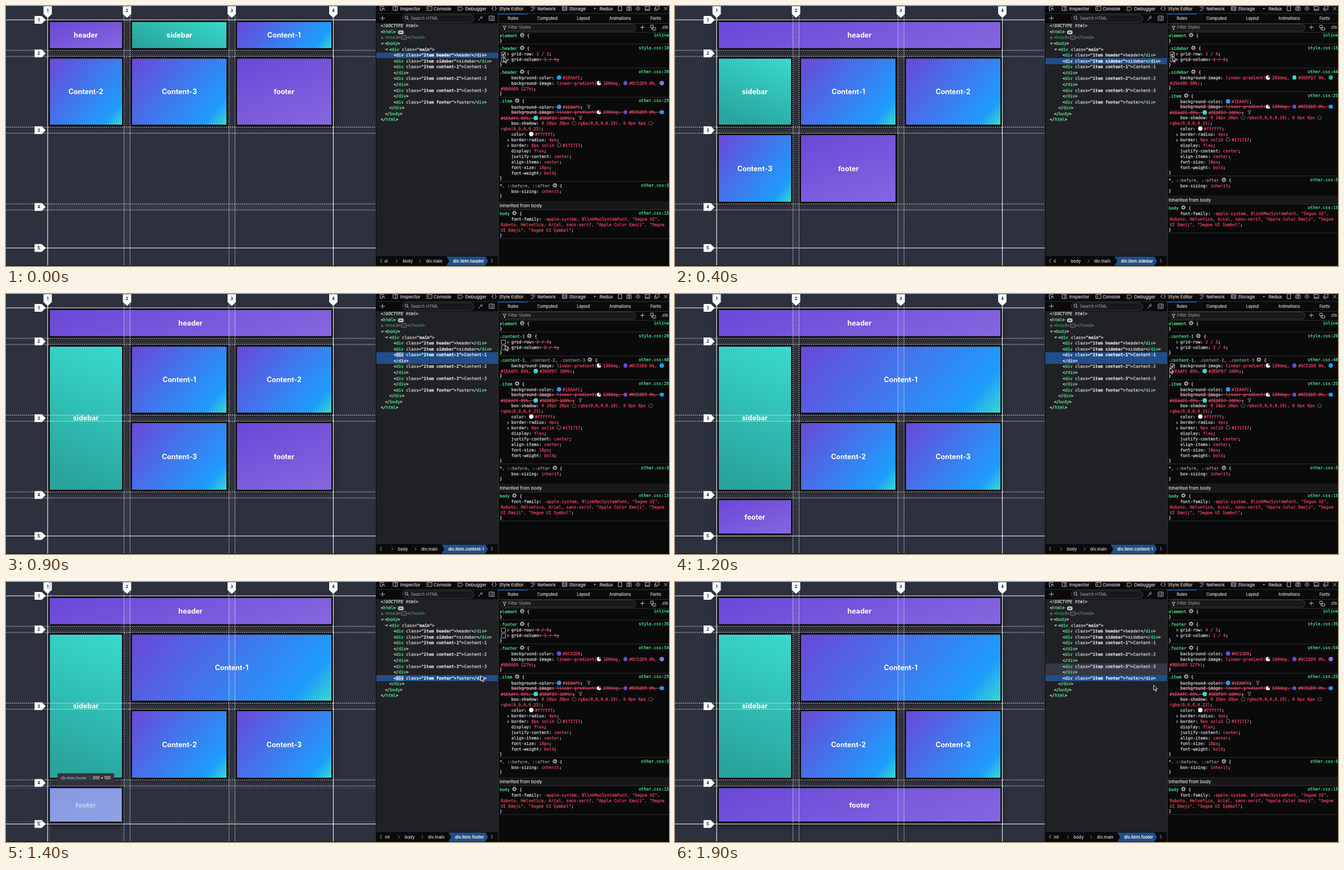
An HTML page for the animation above (2 s loop, 1194 by 469 pixels).

```html
<!DOCTYPE html>
<html lang="en">
<head>
<meta charset="utf-8">
<title>CSS grid inspector</title>
<style>
html, body { margin: 0; width: 100%; height: 100%; overflow: hidden; background: #2d303d; }
body { position: relative; font: 7.4px Inter, sans-serif; color: #dcdce0; }
svg, .layer { position: absolute; left: 0; top: 0; width: 1194px; height: 469px; }
p, .box { position: absolute; margin: 0; }
p { white-space: pre; line-height: 10px; -webkit-text-stroke: .15px; }
#grid { position: absolute; left: 75px; top: 25px; display: grid; gap: 10.9px;
  grid-template: 55px 127.6px 127.6px 68.6px / 137.5px 177.8px 177.5px; }
#grid div { box-sizing: border-box; display: flex; align-items: center; justify-content: center;
  border: 4.1px solid #111113; border-radius: 2.7px; color: #fff; font: bold 12.6px Inter, sans-serif;
  box-shadow: 0 6.9px 13.7px rgba(0,0,0,.19), 0 4px 4px rgba(0,0,0,.23); }
.mid { transform: translateX(-50%); }
.ui { font-size: 8.2px; }
.mono { font: 7.54px/9.95px "DejaVu Sans Mono", monospace; -webkit-text-stroke: .25px; }
.decl { left: 891px; text-indent: 19px; }
.off { text-decoration: line-through #b8465f .8px; }
.mono u { text-decoration: inherit; color: #ee4560; }
.mono em { font-style: normal; color: #4aee8a; }
.dim { color: #939398; }
.mono i { display: inline-block; box-sizing: border-box; width: 7.8px; height: 7.8px; margin: 0 3px 0 .2px;
  border-radius: 50%; border: .8px solid #77777c; vertical-align: -1px; }
.mono svg { position: static; width: 9px; height: 9px; vertical-align: -1.5px; margin: 0 0 0 4px; }
.tail { display: inline-block; text-indent: 0; line-height: 9px; padding-left: 6px; }
.sel, .sel em, .sel b { color: #fff; }
.flash { background: rgba(255,255,255,.28); }
#crumbs { left: 682px; top: 451px; width: 186px; height: 18px; overflow: hidden; display: flex;
  justify-content: flex-end; align-items: center; font-weight: 500; }
#crumbs span { flex: none; }
#crumbs svg { position: static; flex: none; width: 24px; height: 8px; }
#crumbs .cur { padding: 0 7px 0 12px; line-height: 17px; background: #204e8a; color: #fff; font-weight: 600;
  clip-path: polygon(0 0, calc(100% - 5px) 0, 100% 50%, calc(100% - 5px) 100%, 0 100%, 5px 50%); }
.info { transform: translateX(-50%); padding: 0 6.5px; background: #33343b; border-radius: 2px;
  font-size: 6.9px; line-height: 18px; color: #75bfff; }
</style>
</head>
<body>
<div id="grid"></div>
<svg id="lines"></svg>
<div id="highlight" class="layer"></div>
<div id="chrome" class="layer"></div>
<div id="panel" class="layer"></div>
<svg><path id="cursor" d="M0 0v9.500l2.200-2 1.600 3.600 1.600-.7-1.600-3.500h3z" fill="#111" stroke="#fff" stroke-width=".9"/></svg>
<script>
const $ = id => document.getElementById(id);
const text = (x, y, html, cls = '') => `<p class="${cls}" style="left:${x}px;top:${y - 5}px">${html}</p>`;
const box = (x, y, w, h, css) => `<div class="box" style="left:${x}px;top:${y}px;width:${w}px;height:${h}px;${css}"></div>`;
const stroke = (d, color = '#b9b9bd', extra = '') => `<path d="${d}" fill="none" stroke="${color}" ${extra}/>`;

// "|" marks a line break between a swatch and its value
const purple = 'linear-gradient(160deg, #6C52D9 0%, |#9B8AE6 127%)';
const blue = 'linear-gradient(130deg, #6C52D9 0%, |#1EAAFC 85%, #3EDFD7 100%)';
const teal = 'linear-gradient(203deg, #3EDFD7 0%, |#29A49D 90%)';
// How the screen's colour profile shows the named colours
const shades = { '#6C52D9': '#6A48D8', '#9B8AE6': '#8D6FE0', '#1EAAFC': '#1E9DFC', '#3EDFD7': '#38DACE' };
const shade = css => css.replace(/#\w{6}/g, c => shades[c] || c);

const items = {
  header: { row: '1 / 2', col: '1 / 4', line: 10, other: 39, color: '#1EAAFC', image: purple, treeRow: 5 },
  sidebar: { row: '2 / 4', col: '1 / 2', line: 15, other: 44, image: teal, treeRow: 6 },
  'content-1': { row: '2 / 3', col: '2 / 4', line: 20, other: 48, image: blue, treeRow: 7, rows: 2,
    also: '<span class="dim">, .content-2, .content-3</span>' },
  'content-2': { image: blue, treeRow: 9, rows: 2 },
  'content-3': { image: blue, treeRow: 11, rows: 2 },
  footer: { row: '4 / 5', col: '1 / 4', line: 35, other: 54, color: '#6C52D9', image: purple, treeRow: 13 },
};
const placeOrder = ['header', 'sidebar', 'content-1', 'footer'];
const label = name => name.replace(/^c/, 'C');

for (const name in items) {
  const el = items[name].el = document.createElement('div');
  el.textContent = label(name);
  el.style.background = shade(items[name].image.replace('|', ''));
  $('grid').append(el);
}

function drawGridLines() {
  const cols = [[212.5, 223.5], [401.5, 412.5]], rows = [[80, 91], [218.5, 229.5], [357, 368]];
  const white = 'stroke-width="1.1"', dash = 'stroke-dasharray="2.2 1.4" stroke-width=".9" opacity=".85"';
  const tag = (x, y, n, d) => `<g transform="translate(${x} ${y})"><path d="${d}" fill="#fff"/>
    <text y="2.5" text-anchor="middle" font-size="7" font-weight="700" fill="#111">${n}</text></g>`;
  $('lines').innerHTML = `<pattern id="hatch" width="4" height="4" patternUnits="userSpaceOnUse">
    <path d="M-1 1L1-1M0 4L4 0M3 5L5 3" stroke="#fff" stroke-width=".6" opacity=".24"/></pattern>`
    + cols.map(([a, b]) => `<rect x="${a}" y="25" width="${b - a}" height="411" fill="url(#hatch)"/>`).join('')
    + rows.map(([a, b]) => `<rect x="75" y="${a}" width="515" height="${b - a}" fill="url(#hatch)"/>`).join('')
    + stroke('M75 0V469M589.500 0V469M0 25H666M0 436.500H666', '#fff', white)
    + stroke(cols.flat().map(x => `M${x} 0V469`).join('') + rows.flat().map(y => `M0 ${y}H666`).join(''), '#fff', dash)
    + [75, 218, 406.5, 589.5].map((x, i) => tag(x, 8.5, i + 1, 'M-7.500-8h15v14l-7.500 7-7.500-7z')).join('')
    + [25, 85.5, 224, 362.5, 436.5].map((y, i) => tag(59, y, i + 1, 'M-7.500-7h13l7 7-7 7h-13z')).join('');
}

function drawChrome() {
  const tabs = [[710, 'Inspector'], [770, 'Console'], [827, 'Debugger'], [888, 'Style Editor'],
    [957, 'Network'], [1014, 'Storage'], [1069, 'Redux']];
  const sideTabs = [[913, 'Rules'], [975, 'Computed'], [1040, 'Layout'], [1106, 'Animations'], [1170, 'Fonts']];
  const pill = 'box-sizing:border-box;border:1px solid #3c3c41;border-radius:8px;background:#19191b';
  $('chrome').innerHTML = box(0, 467.5, 1194, 2, 'background:#111')
    + box(666, 0, 528, 469, 'background:#0a0a0b') + box(667, 31, 219, 420, 'background:#202124')
    + box(886, 14, 1, 455, 'background:#38383d') + box(667, 13, 527, .7, 'background:#303034')
    + box(887, 31, 307, .7, 'background:#303034') + box(887, 46.5, 307, .7, 'background:#303034')
    + box(887, 13.5, 53, 1.5, 'background:#0a84ff')
    + box(713, 15, 130, 14.5, pill) + box(889, 32, 246, 14, pill)
    + tabs.map(([x, s]) => text(x, 4.5, s, 'ui')).join('')
    + sideTabs.map(([x, s]) => text(x, 22.5, s, 'mid')).join('')
    + text(729, 22.5, '<span class="dim" style="font-size:7.7px">Search HTML</span>')
    + text(904, 39, '<span class="dim">Filter Styles</span>') + text(1180, 38.5, '.cls')
    + '<svg>' + stroke('M681 1h-7v7h3M678 4l5 4M678 8V4h4M697 1h8v7h-8zM702 1v7M758 1h9v7h-9zM760 3l2 1.500-2 1.500'
      + 'M814 2h6l3 3-3 3h-6zM878 1q-2 0-2 2t-1.500 1.500q1.500 0 1.500 1.500t2 2M880 1q2 0 2 2t1.500 1.500q-1.500 0-1.500 1.500t-2 2'
      + 'M945 2h8M947 5h6M945 8h5M1002 1h8v7h-8zM1002 3.500h8M1002 6h8M1102.500 0h6v8.500h-6zM1118 2h8v6h-8zM1120 1h4'
      + 'M1151 1h8v7h-8zM1151 6h8M1170 0h6v6h-6zM1168 3v5h5M1185 1.500l6 6M1191 1.500l-6 6'
      + 'M673.500 22h9M678 17.500v9M851 26l5-5M854 19l4 4M856 21l2-3M723 23l2.500 2.500M870 18h9v8h-9zM876 18v8M872 20l2 2-2 2'
      + 'M895 36.500h6l-2.300 3v3h-1.400v-3zM1142 38.500h8M1146 34.500v8M1161 34.500h4.500v4.500h-4.500zM1165 39h5v4.500h-5zM1163 39v3h2'
      + 'M677 456l-3 3.500 3 3.500M873.500 456l3 3.500-3 3.500')
    + '<g fill="none" stroke="#b9b9bd"><circle cx="721" cy="21" r="2.700"/><circle cx="1122" cy="5" r="1.500"/>'
    + '<circle cx="1138" cy="4.500" r="2"/><circle cx="1138" cy="4.500" r="3.800" stroke-dasharray="1.500 1.480"/></g>'
    + '<circle cx="1060.500" cy="4.500" r="1.600" fill="#3fb0a5"/></svg>';
}

const arrow = (x, y, open) => `<svg><path transform="translate(${x} ${y})" fill="${open ? '#a5a5a9' : '#77777c'}"
  d="${open ? 'M-3-1.500h6l-3 3.500z' : 'M-1.500-3v6l3.500-3z'}"/></svg>`;

function tree(sel, hover, flash) {
  const rowY = i => 36.3 + 10.57 * i;
  const close = name => `&lt;/<em>${name}</em>&gt;`;
  const open = (name, cls) => `&lt;<em>${name}</em> class=<b>"${cls}"</b>&gt;`;
  const line = (i, depth, html, cls = '') => text(674.8 + 7.7 * depth, rowY(i), html, 'mono ' + cls);
  const band = (name, color) => name ? box(667, rowY(items[name].treeRow) - 5.3, 219, 10.57 * (items[name].rows || 1),
    'background:' + color) : '';
  let html = band(hover, '#343843') + band(sel, '#204e8a')
    + line(0, 0, '<span style="font-style:italic">&lt;!DOCTYPE html&gt;</span>')
    + line(1, 0, '&lt;<em>html</em>&gt;') + box(706, 44, 10, 6.5, 'background:#c9c9cd;border-radius:3px')
    + text(711, 47, '<span style="font-size:5px;color:#222">ev</span>', 'mid')
    + line(2, 1, '<span style="opacity:.5">&lt;<em>head</em>&gt;<span style="border:.6px solid;border-radius:3px;'
      + 'font-size:5px;margin:0 1px">•••</span>' + close('head') + '</span>')
    + line(3, 1, '&lt;<em>body</em>&gt;') + line(4, 2, open('div', 'main'))
    + arrow(678, 57.5) + arrow(678, 68, 1) + arrow(685.5, 78.5, 1);
  for (const name in items) {
    const { treeRow, rows } = items[name], cls = name == sel ? 'sel' : '';
    let start = open('div', 'item ' + name) + label(name);
    if (flash && name == sel) start = start.replace('<em>', '<em class="flash">');
    html += line(treeRow, 3, start + (rows ? '' : close('div')), cls);
    if (rows) html += line(treeRow + 1, 3, close('div'), cls);
  }
  return html + line(14, 2, close('div')) + line(15, 1, close('body')) + line(16, 0, close('html'));
}

const gear = '<svg viewBox="-5 -5 10 10" fill="none" stroke="#b9b9bd"><circle r="2.500" stroke-width="1.600"/>'
  + '<circle r="4" stroke-width="1.400" stroke-dasharray="1.600 1.540"/></svg>';
const funnel = '<span class="tail"><svg style="margin:0" viewBox="0 0 9 9" fill="none" stroke="#85858a">'
  + '<path d="M1.500 2h6L5.200 5v3H3.800V5z"/></svg></span>';

function swatched(value) {
  return value.replace(/(\|?)(#\w{6}|rgba\([^)]*\)|\d+deg)/g, (_, br, v) => {
    const fill = v.endsWith('deg') ? 'conic-gradient(#555 0 30%, #fff 0)' : v == '#171717' ? '#111' : shade(v);
    return `<i style="background:${fill}${/^#(?!17)|deg/.test(v) ? ';border:0' : ''}"></i>${br && '\n'}${v}`;
  });
}

function checkbox(y, on) {
  return '<svg>' + stroke(`M892 ${y - 3.7}h7.400v7.400h-7.400z`, '#c5c5c9', 'stroke-width=".9"')
    + (on ? stroke(`M893.500 ${y}l1.800 2 3-4`, '#fff', 'stroke-width="1.200"') : '') + '</svg>';
}

// Each declaration: [name, value, {off, tail, check, expand}]
function rules(sel, rowOn, colOn, hovered) {
  const it = items[sel];
  let y = 53, html = '';
  const rule = (selector, source, decls, overhead = 22.9) => {
    html += text(889, y, `<em>${selector}</em>${gear} {`, 'mono')
      + `<p class="mono" style="right:0;top:${y - 5}px"><em>${source}</em></p>`;
    let n = 0;
    for (const [name, value, { off, tail = '', check, expand } = {}] of decls) {
      const dy = y + 11 + 9.95 * n, body = swatched(value);
      html += `<p class="mono decl ${off ? 'off' : ''}" style="top:${dy - 5}px">${name}: <u>${body}</u>;${tail}</p>`;
      if (expand) html += arrow(904.5, dy);
      if (check !== undefined) html += checkbox(dy, check);
      n += body.split('\n').length;
    }
    html += text(889, y + 9.8 + 9.95 * n, '}', 'mono');
    y += overhead + 9.95 * n;
    html += box(887, y - 7.5, 307, .7, 'background:#2c2c30');
  };
  const placed = (name, value, on) => [name, value, { off: !on, expand: 1, check: !on || hovered == 1 ? on : undefined }];
  const beaten = it.color ? { off: 1, tail: funnel } : {};

  rule('element', 'inline', []);
  rule('.' + sel, 'style.css:' + it.line, [placed('grid-row', it.row, rowOn), placed('grid-column', it.col, colOn)]);
  rule('.' + sel + (it.also || ''), 'other.css:' + it.other, [
    ...(it.color ? [['background-color', it.color]] : []),
    ['background-image', it.image, { check: hovered == 2 ? 1 : undefined }]]);
  rule('.item', 'other.css:25', [
    ['background-color', '#1EAAFC', beaten], ['background-image', blue, { off: 1, tail: funnel }],
    ['box-shadow', '0 10px 20px rgba(0,0,0,0.19), 0 6px 6px |rgba(0,0,0,0.23)'],
    ['color', '#ffffff'], ['border-radius', '4px', { expand: 1 }], ['border', '6px solid #171717', { expand: 1 }],
    ['display', 'flex'], ['justify-content', 'center'], ['align-items', 'center'],
    ['font-size', '18px'], ['font-weight', 'bold']]);
  rule('*<span class="dim">, ::before, ::after</span>', 'other.css:5', [['box-sizing', 'inherit']], 40.4);
  html += box(887, y - 22.5, 307, 15, 'background:#18181a') + text(889, y - 14.3, '<span class="ui">Inherited from body</span>');
  rule('body', 'other.css:15', [['font-family', '-apple-system, BlinkMacSystemFont, "Segoe UI",\nRoboto, Helvetica, '
    + 'Arial, sans-serif, "Apple Color Emoji", "Segoe\nUI Emoji", "Segoe UI Symbol"']]);
  return html;
}

function crumbs(sel) {
  const chevron = '<svg viewBox="0 0 24 8">' + stroke('M12 1l3 3-3 3', '#85858a') + '</svg>';
  return `<div id="crumbs" class="box"><span style="margin-right:3px">html</span>${chevron}<span>body</span>${chevron}
    <span>div.main</span><span style="width:7px"></span><span class="cur">div.item.${sel}</span></div>`;
}

function highlight(name) {
  if (!name) return '';
  const { el, image } = items[name], r = el.getBoundingClientRect(), b = 4.1, size = v => Math.round(v / .687);
  const [x0, x1, y0, y1] = [r.left + b, r.right - b, r.top + b, r.bottom - b], mid = (x0 + x1) / 2, tip = r.top - 5;
  const tint = 'rgba(150,193,230,.66)';
  // The tint is lost on the bright end of the blue gradient
  const fill = image == blue ? `linear-gradient(130deg, ${tint} 60%, rgba(150,193,230,.1) 67%)` : tint;
  return box(x0, y0, x1 - x0, y1 - y0, 'background:' + fill)
    + '<svg>' + stroke(`M${x0} 0V469M${x1} 0V469M0 ${y0}H666M0 ${y1}H666`, '#2a6fd6', 'stroke-dasharray="3 2" stroke-width=".9"')
    + `<path d="M${mid - 4} ${tip}h8l-4 4z" fill="#33343b"/></svg>`
    + `<p class="info" style="left:${mid}px;top:${tip - 18}px"><span style="color:#b98eff">div</span>.item.${name}`
    + `<span style="color:#77777c">  |  </span><span style="color:#eee">${size(r.width)} × ${size(r.height)}</span></p>`;
}

// [selected, placed items, row on, column on, cursor x, y, hovered node, overlay shown]
const [H, S, C, F] = placeOrder;
const steps = [
  [H, 0, 1, 0, 896, 92], [H, 1, 1, 1, 896, 92], [H, 1, 1, 1, 866, 101, S, 1],
  [S, 1, 0, 0, 896, 88], [S, 1, 1, 0, 896, 90], [S, 2, 1, 0, 896, 92], [S, 2, 1, 1, 896, 95],
  [S, 2, 1, 1, 868, 118, C, 1], [C, 2, 0, 0, 868, 114, C, 1],
  [C, 2, 0, 0, 899, 92], [C, 2, 1, 0, 896, 90], [C, 3, 1, 1, 896, 95], [C, 3, 1, 1, 891, 133],
  [C, 3, 1, 1, 857, 170, F, 1], [F, 3, 0, 0, 855, 169, F, 1],
  [F, 3, 0, 0, 896, 88], [F, 3, 1, 0, 896, 90], [F, 4, 1, 1, 896, 94], [F, 4, 1, 1, 896, 96],
  [F, 4, 1, 1, 862, 186, 'content-3'],
];

function render([sel, placedCount, rowOn, colOn, x, y, hover, overlay]) {
  placeOrder.forEach((name, i) => {
    const { el, row, col } = items[name], on = i < placedCount;
    el.style.gridRow = on ? row : 'auto';
    el.style.gridColumn = on ? col : 'auto';
  });
  const hovered = x < 887 ? 0 : y < 112 ? 1 : 2;
  const flash = sel == C && !rowOn || sel == hover && overlay;
  $('highlight').innerHTML = overlay ? highlight(hover) : '';
  $('panel').innerHTML = tree(sel, hover, flash) + rules(sel, rowOn, colOn, hovered) + crumbs(sel);
  $('cursor').setAttribute('transform', `translate(${x} ${y})`);
}

let shown = -1;
function tick() {
  const step = Math.floor(performance.now() / 100) % steps.length;
  if (step != shown) render(steps[shown = step]);
  requestAnimationFrame(tick);
}
drawGridLines();
drawChrome();
tick();
</script>
</body>
</html>
```
